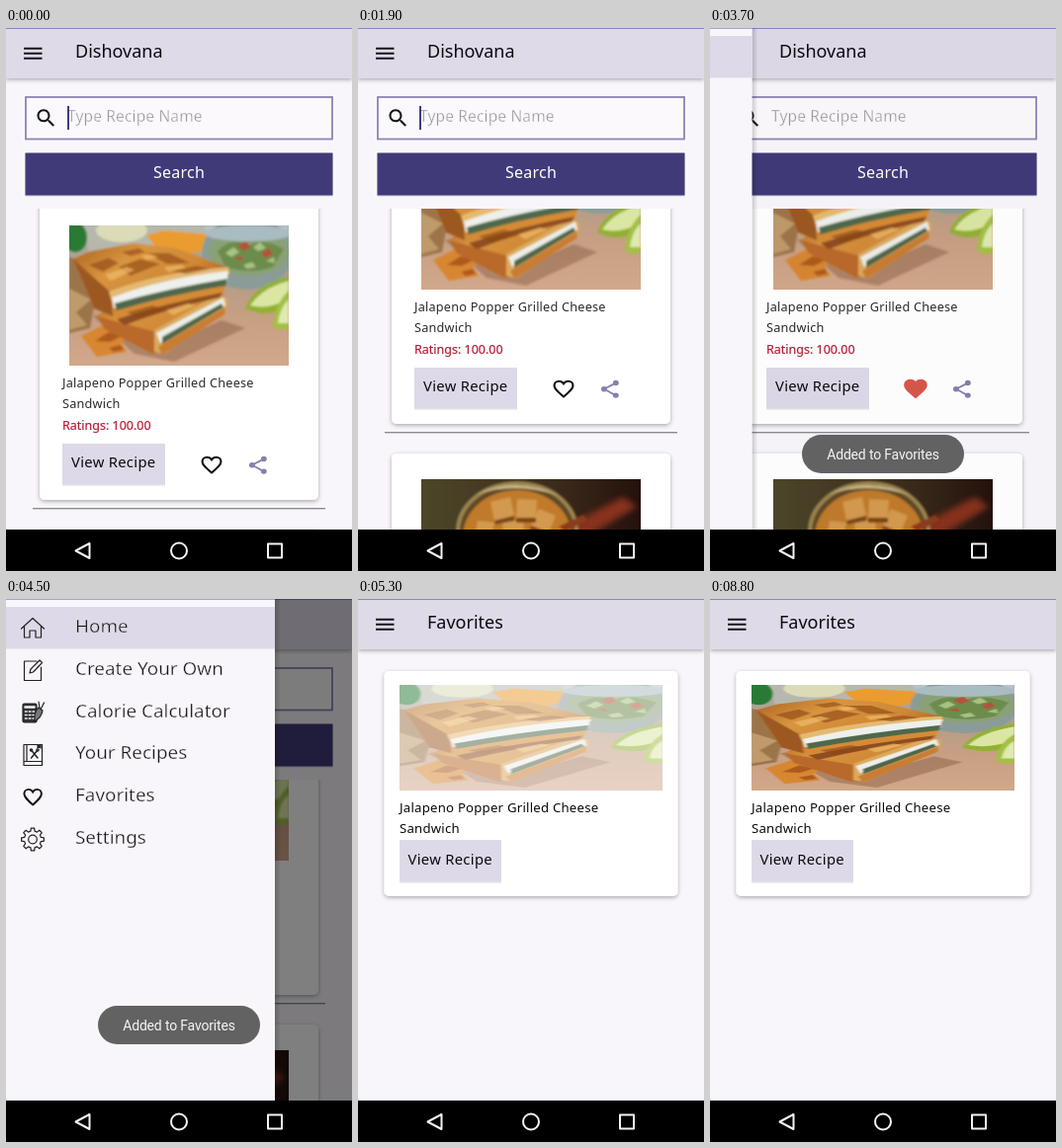
An HTML page that plays this animation: 350x550 px, repeating every 9.1 s.

```html
<!DOCTYPE html>
<html lang="en">
<head>
<meta charset="utf-8">
<title>Recipe app demo</title>
<style>
  html, body { margin: 0; width: 100%; height: 100%; overflow: hidden; background: #f9f6fb; }
  svg { display: block; width: 100vw; height: 100vh; }
  text { font-family: "Noto Sans", "Open Sans", sans-serif; fill: #0b0a0d; white-space: pre; }
  .title { font-size: 18px; }
  .dish { font-size: 12.7px; letter-spacing: .21px; fill: #2c2b2e; }
  .dish.big { font-size: 13.2px; letter-spacing: .22px; fill: #0b0a0d; }
  .rating { font-size: 12.5px; fill: #b71c38; stroke: #b71c38; stroke-width: .2; }
  .btn { font-size: 14.8px; letter-spacing: .3px; }
  /* A hairline in the paper colour thins the strokes of the light labels. */
  .hint, .item { stroke: #f9f6fb; stroke-width: .4; }
  .hint { font-size: 15.5px; letter-spacing: .15px; fill: #98959d; }
  .item { font-size: 18.9px; fill: #161518; }
  .toast { font: 14px Roboto, sans-serif; letter-spacing: -.17px; fill: #f4f4f4; }
  .thin { fill: none; stroke: #222; stroke-width: 1.2; stroke-linejoin: round; stroke-linecap: round; }
  .nav { fill: none; stroke: #f4f4f4; stroke-width: 2; stroke-linejoin: round; }
  .card { fill: #fff; filter: url(#soft); }
  .chip { fill: #ded9e8; filter: url(#faint); }
</style>
</head>
<body>
<svg viewBox="0 0 350 550" preserveAspectRatio="none">
  <defs>
    <filter id="soft" x="-10%" y="-10%" width="120%" height="125%">
      <feDropShadow dx="0" dy="1.5" stdDeviation="2" flood-opacity=".32"/>
    </filter>
    <filter id="faint" x="-10%" y="-10%" width="120%" height="130%">
      <feDropShadow dx="0" dy=".7" stdDeviation=".7" flood-opacity=".2"/>
    </filter>
    <filter id="blur" x="-5%" y="-5%" width="110%" height="110%"><feGaussianBlur stdDeviation=".8"/></filter>
    <filter id="haze" x="-20%" y="-20%" width="140%" height="140%"><feGaussianBlur stdDeviation="3"/></filter>
    <clipPath id="list"><rect y="183" width="350" height="325"/></clipPath>
    <clipPath id="screen"><rect width="350" height="508"/></clipPath>
    <linearGradient id="board" x2="0" y2="1">
      <stop offset="0" stop-color="#a9aca8"/><stop offset=".35" stop-color="#b39c89"/>
      <stop offset=".65" stop-color="#c79f83"/><stop offset="1" stop-color="#d2a88b"/>
    </linearGradient>
    <linearGradient id="crust" x2="1" y2=".6">
      <stop offset="0" stop-color="#a9611f"/><stop offset=".35" stop-color="#d8943f"/>
      <stop offset=".7" stop-color="#cf8836"/><stop offset="1" stop-color="#a65a1d"/>
    </linearGradient>
    <linearGradient id="dusk" x2="1">
      <stop offset="0" stop-color="#4c4729"/><stop offset=".6" stop-color="#3d2c1b"/><stop offset="1" stop-color="#24110d"/>
    </linearGradient>
    <linearGradient id="edge" x2="1"><stop offset="0" stop-color="#000" stop-opacity=".18"/><stop offset="1" stop-color="#000" stop-opacity="0"/></linearGradient>

    <symbol id="sandwich" viewBox="0 0 222 142" preserveAspectRatio="none">
      <rect width="222" height="142" fill="url(#board)"/>
      <g filter="url(#blur)">
        <path d="M15 0H140V18L20 28Z" fill="#b6b8ad"/>
        <ellipse cx="53" cy="5" rx="26" ry="12" fill="#dcdbb8"/>
        <ellipse cx="6" cy="12" rx="12" ry="15" fill="#2c7a36"/>
        <path d="M78 10L96 5 140 9 146 24 112 30 88 22Z" fill="#eb9c2e"/>
        <path d="M136 0H222V34H150Z" fill="#b9c3c7"/>
        <ellipse cx="180" cy="28" rx="46" ry="37" fill="#8b9c98"/>
        <ellipse cx="182" cy="27" rx="41" ry="24" fill="#8aa077"/>
        <ellipse cx="181" cy="8" rx="44" ry="8" fill="#a9bcc2"/>
        <path d="M150 26Q166 10 181 21 195 11 217 24L206 42Q184 50 158 42Z" fill="#6c8c4c"/>
        <path d="M158 28l8-6 6 5-8 5zM186 22l7-5 6 6-8 3zM176 40l9-3 4 5-9 2zM199 36l8-4 1 6z" fill="#a9c281"/>
        <path d="M170 20l9-4 5 6-8 4zM194 28l8-5 4 6-8 4zM166 34l8-3 2 5z" fill="#b3523a"/>
        <path d="M0 32L14 37 26 77 21 104 0 109Z" fill="#9b744a"/>
        <path d="M0 64L22 75 7 88 18 101 0 106Z" fill="#bf9a6b"/>
        <path d="M24 92L48 86 92 124 154 96 178 104 106 138 66 130Z" fill="#6d4528" opacity=".35"/>
        <path d="M12 112L38 99 66 108 52 119 58 128 28 133Z" fill="#d88632"/>
        <path d="M26 117l14-9 13 4-12 6zM40 124l12-3 3 5-10 2z" fill="#ad5a1d"/>

        <path d="M28 92L52 72 150 66 160 76 96 108 86 122Z" fill="url(#crust)"/>
        <path d="M28 92L88 108 89 129 84 130 36 105Z" fill="#b9692a"/>
        <path d="M86 106L150 70 160 74 159 86 96 130 86 128Z" fill="#dca95c"/>
        <path d="M88 109L156 73 158 81 92 119Z" fill="#eceee8"/>
        <path d="M94 113L154 79 156 83 94 120Z" fill="#50664a"/>
        <path d="M90 123L158 83 157 90 94 131Z" fill="#c97b30"/>

        <path d="M4 34L22 26 66 18 108 23 162 43 161 54 100 62 45 78 40 88 24 82Z" fill="url(#crust)"/>
        <path d="M4 34L42 68 44 92 25 84Z" fill="#9d5820"/>
        <path d="M40 67Q92 47 161 42L162 49Q94 54 43 76Z" fill="#e4ba72"/>
        <path d="M43 73Q96 53 161 46L160 57Q96 65 45 84Z" fill="#edf0ec"/>
        <path d="M46 79Q98 64 160 54L158 62Q98 71 48 87Z" fill="#4f684c"/>
        <path d="M45 87Q98 71 158 61L155 70Q100 78 50 98Z" fill="#d58b36"/>
        <path d="M48 95Q100 78 155 68L152 73Q100 84 56 101Z" fill="#8e4e20"/>
        <path d="M20 40L40 33 50 38 34 47ZM50 42L72 34 92 39 62 51ZM78 28L101 28 122 38 99 39ZM53 27l17-4 7 4-15 4ZM104 46l24-5 14 3-24 5ZM58 88l26-7 13 4-26 9Z" fill="#8d4615" opacity=".6"/>
        <path d="M36 50l22-8 8 3-24 11ZM96 42l18-2 4 3-18 4ZM72 31l10-2 8 3-11 3ZM98 86l22-7 8 2-23 10Z" fill="#f0bd69" opacity=".7"/>
        <path d="M178 84Q188 59 222 52V82Q200 95 178 84Z" fill="#91b133"/>
        <path d="M183 81Q195 63 222 56V74Q202 86 183 81Z" fill="#dbe6a3"/>
        <path d="M206 102Q208 79 222 66V104Q214 109 206 102Z" fill="#a3c044"/>
        <path d="M211 99Q213 83 222 75V99Z" fill="#e0e9b0"/>
      </g>
    </symbol>
    <symbol id="jar" viewBox="0 0 222 142" preserveAspectRatio="none">
      <rect width="222" height="142" fill="url(#dusk)"/>
      <path d="M146 48L204 18 218 28 154 66Z" fill="#87301c" filter="url(#haze)"/>
      <g filter="url(#blur)">
        <ellipse cx="97" cy="52" rx="62" ry="50" fill="#9c8450"/>
        <ellipse cx="97" cy="53" rx="58" ry="47" fill="#5f4a28"/>
        <ellipse cx="97" cy="58" rx="55" ry="47" fill="#c07a2c"/>
        <path d="M42 60H152L148 142H48Z" fill="#b66e2a"/>
        <path d="M70 23l20-5 4 19-20 5zM97 20l20 1-1 18-20 0zM119 30l17 7-7 17-18-7zM57 42l17 2-4 17-16-3zM82 43l21-1 2 18-22 1z" fill="#d39a4f"/>
        <path d="M74 42l20-5v5l-19 4zM96 39h20v5H96zM111 47l18 7-2 4-17-7z" fill="#7d4519"/>
        <path d="M139 48L164 36 168 42 146 53Z" fill="#8d3a1f"/>
        <path d="M56 15Q97-4 140 17Q97 2 56 15Z" fill="#cdbb8a"/>
      </g>
    </symbol>

    <path id="heart" d="M12 21.35l-1.45-1.32C5.4 15.36 2 12.28 2 8.5 2 5.42 4.42 3 7.5 3c1.74 0 3.41.81 4.5 2.09C13.09 3.81 14.76 3 16.5 3 19.58 3 22 5.42 22 8.5c0 3.78-3.4 6.86-8.55 11.54z"/>
    <path id="heartLine" d="M12 20C6.5 15 3 12 3 8.5 3 6 5 4 7.5 4 9.3 4 11 5 12 6.7 13 5 14.7 4 16.5 4 19 4 21 6 21 8.5 21 12 17.5 15 12 20Z" fill="none" stroke="#111" stroke-width="2"/>
    <g id="share" fill="#877fae" stroke="#877fae" stroke-width="2">
      <path d="M18 5L6 12 18 19" fill="none"/>
      <circle cx="18" cy="5" r="2"/><circle cx="6" cy="12" r="2"/><circle cx="18" cy="19" r="2"/>
    </g>
    <g id="bar">
      <rect width="350" height="51" fill="#dfdae8" filter="url(#soft)"/>
      <rect width="350" height="1" fill="#8f86b8"/>
      <path d="M18 20.8H36.5M18 25.8H36.5M18 30.8H36.5" stroke="#161518" stroke-width="2"/>
    </g>
  </defs>

  <rect width="350" height="550" fill="#f9f6fb"/>
  <g clip-path="url(#screen)">
    <g id="home">
      <g clip-path="url(#list)">
        <g id="scroll">
          <rect class="card" x="34" y="174" width="282" height="304" rx="5"/>
          <use href="#sandwich" x="64" y="200" width="222" height="142"/>
          <text class="dish" x="57" y="363.5">Jalapeno Popper Grilled Cheese</text>
          <text class="dish" x="57" y="385">Sandwich</text>
          <text class="rating" x="57" y="407">Ratings: 100.00</text>
          <rect class="chip" x="57" y="421" width="104" height="41.500"/>
          <text class="btn" x="66" y="445">View Recipe</text>
          <use id="empty" href="#heartLine" transform="translate(195.400 430.800) scale(1.05 .98)"/>
          <use id="full" href="#heart" transform="translate(193.800 429.500) scale(1.18 1.07)" fill="#d8564b"/>
          <use href="#share" transform="translate(243 432) scale(.99 .9)"/>
          <rect x="27" y="486" width="296" height="1.4" fill="#8c8991"/>
          <rect class="card" x="34" y="508" width="282" height="304" rx="5"/>
          <use href="#jar" x="64" y="534" width="222" height="142"/>
        </g>
      </g>
      <use href="#bar"/>
      <text class="title" x="70" y="30">Dishovana</text>
      <rect x="20" y="70" width="310" height="42.5" fill="#fbf9fc" stroke="#8c84b4" stroke-width="1.800"/>
      <path transform="translate(28.500 79.300)" fill="#111" d="M15.5 14h-.79l-.28-.27C15.41 12.59 16 11.11 16 9.5 16 5.91 13.09 3 9.5 3S3 5.91 3 9.5 5.91 16 9.5 16c1.61 0 3.09-.59 4.23-1.57l.27.28v.79l5 4.99L20.490 19zM9.500 14C7.010 14 5 11.990 5 9.500S7.010 5 9.500 5 14 7.010 14 9.500 11.990 14 9.500 14z"/>
      <text class="hint" x="62" y="95">Type Recipe Name</text>
      <rect id="caret" x="62" y="79" width="2" height="24" fill="#403a7a"/>
      <rect x="19.5" y="126.5" width="311" height="43" fill="#403a78" filter="url(#faint)"/>
      <text x="175" y="152" font-size="16" letter-spacing=".25" text-anchor="middle" style="fill:#fff">Search</text>
    </g>

    <g id="favs">
      <use href="#bar"/>
      <text class="title" x="70" y="30">Favorites</text>
      <rect class="card" x="26.5" y="73" width="297" height="228" rx="5"/>
      <use id="photo" href="#sandwich" x="42" y="87" width="266" height="107"/>
      <text class="dish big" x="42" y="215.5">Jalapeno Popper Grilled Cheese</text>
      <text class="dish big" x="42" y="237">Sandwich</text>
      <rect class="chip" x="42" y="244" width="103" height="42.5"/>
      <text class="btn" x="50.5" y="269">View Recipe</text>
    </g>

    <rect id="scrim" width="350" height="508"/>
    <g id="drawer">
      <rect x="272" width="6" height="508" fill="url(#edge)"/>
      <rect width="272" height="508" fill="#f9f6fb"/>
      <rect width="272" height="1" fill="#aaa3c6"/>
      <rect id="mark" width="272" height="42.5" fill="#ded9e8"/>
      <g id="items"></g>
      <path class="thin" d="M15.5 30L27 19.5 38.5 30M18.5 28V39H24V32H30V39H35.5V28"/>
      <path class="thin" d="M31 63H18.5V82.5H35.5V69M24 75L25 71 34 62 36.5 64.5 27.5 74Z"/>
      <g class="thin">
        <rect x="17" y="106" width="14" height="19" rx="1.5" fill="#333"/>
        <path d="M19.5 109.5H28.5" stroke="#f4f2f6" stroke-width="2.5"/>
        <path d="M19.5 114H29M19.5 117.5H29M19.5 121H29" stroke="#f4f2f6" stroke-width="1.6" stroke-dasharray="1.6 2.2"/>
        <path d="M29 124Q28 114 33 110L37 113Q36 120 29 124ZM34 110L33 104M35.5 111L38.5 105" fill="#777"/>
      </g>
      <g class="thin">
        <path d="M18 147.5H36.5V168.5H18ZM21 147.5V164.5M18 164.5H36.5"/>
        <path d="M25.5 153L32 161M32 153L25.5 161" stroke-width="1.5"/>
        <circle cx="25.5" cy="153" r="1.2"/><circle cx="32" cy="153" r="1.2"/>
        <path d="M32 147.5V151L33.5 150 35 151V147.5" fill="#333"/>
      </g>
      <use href="#heartLine" transform="translate(15.5 189) scale(.97)"/>
      <g class="thin"><path id="gear"/><circle cx="27" cy="243.5" r="4.3"/></g>
    </g>
  </g>

  <g id="toast">
    <rect x="93" y="412" width="164" height="39" rx="19.5" fill="#626262"/>
    <text class="toast" x="175" y="436.7" text-anchor="middle">Added to Favorites</text>
  </g>

  <rect y="508" width="350" height="42" fill="#000"/>
  <path class="nav" d="M70.5 529.5L84.5 522V537Z"/>
  <circle class="nav" cx="175" cy="529.5" r="8"/>
  <rect class="nav" x="265" y="522.5" width="14" height="14"/>
</svg>
<script>
const LOOP = 9100, DRAWER = 272, SCROLL = 77;
const $ = id => document.getElementById(id);
const set = (id, name, value) => $(id).setAttribute(name, value);
const show = (id, on) => set(id, 'visibility', on ? 'visible' : 'hidden');
const ramp = (t, a, b) => Math.min(1, Math.max(0, (t - a) / (b - a)));
const ease = (t, a, b) => { const p = ramp(t, a, b); return p * p * (3 - 2 * p); };

const names = ['Home', 'Create Your Own', 'Calorie Calculator', 'Your Recipes', 'Favorites', 'Settings'];
$('items').innerHTML = names.map((name, i) =>
  `<text class="item" x="70" y="${34 + i * 42.8}">${name}</text>`).join('');

function gearPath(cx, cy, teeth) {
  const points = [];
  for (let i = 0; i < teeth; i++) {
    for (const [offset, r] of [[-.31, 8.6], [-.19, 11.5], [.19, 11.5], [.31, 8.6]]) {
      const a = (i + offset) * 2 * Math.PI / teeth;
      points.push((cx + r * Math.sin(a)).toFixed(2) + ' ' + (cy - r * Math.cos(a)).toFixed(2));
    }
  }
  return 'M' + points.join('L') + 'Z';
}
set('gear', 'd', gearPath(27, 243.5, 8));

function draw(t) {
  const liked = t >= 2600, onFavs = t >= 4800;
  const beat = t % 1000;
  show('home', !onFavs);
  show('favs', onFavs);
  show('caret', !onFavs && (beat < 350 || beat >= 850));
  show('empty', !onFavs && !liked);
  show('full', !onFavs && liked);
  set('scroll', 'transform', `translate(0 ${-SCROLL * ease(t, 950, 1350)})`);

  const open = ease(t, 3600, 4000) - ease(t, 4800, 5200);
  show('drawer', open > 0);
  set('drawer', 'transform', `translate(${DRAWER * (open - 1)} 0)`);
  set('scrim', 'opacity', .5 * open * open);
  set('mark', 'y', onFavs ? 179 : 8);

  set('toast', 'opacity', ramp(t, 2700, 2900) - ramp(t, 4800, 5000));
  set('photo', 'opacity', ramp(t, 5130, 5460));
}

let start;
function tick(now) {
  start ??= now;
  draw((now - start) % LOOP);
  requestAnimationFrame(tick);
}
draw(0);
requestAnimationFrame(tick);
</script>
</body>
</html>
```
